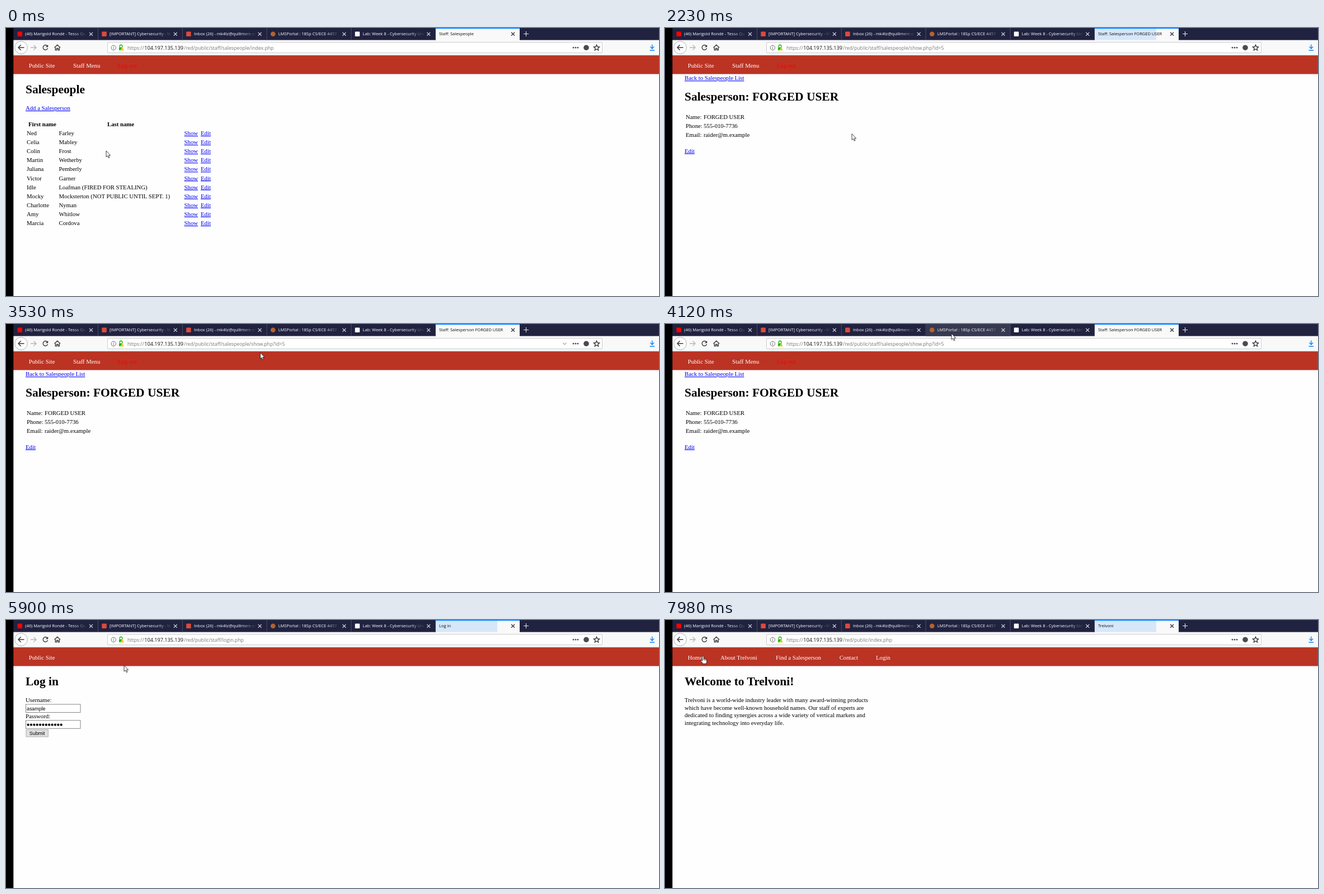
An HTML page that plays this animation: 1167x480 px, repeating every 8 s.

```html
<!DOCTYPE html>
<html lang="en">
<head>
<meta charset="utf-8">
<title>Staff pages</title>
<style>
html, body { margin: 0; width: 100%; height: 100%; overflow: hidden; background: #fff; }
svg { display: block; width: 1167px; height: 480px; }
.page text { font: 10.72px "Liberation Serif", serif; }
.page .h1 { font-size: 21.44px; font-weight: bold; }
.page .th { font-weight: bold; }
.page .nav { fill: #fff; }
.page .out { fill: #f00; }
.page .link { fill: #00e; text-decoration: underline; }
.page .field { font: 8.9px "Liberation Sans", sans-serif; }
.tab { font: 7.5px "Open Sans", sans-serif; }
.url { font: 8.7px "Open Sans", sans-serif; fill: #77777a; }
.line { fill: none; stroke: #38383d; stroke-width: 1.4; }
.thin { stroke: #68686c; stroke-width: 1; }
.blue { stroke: #0a84ff; }
.green { stroke: #12bc00; }
.pale { stroke: #b5b5b8; }
.light { stroke: #e6e6ee; stroke-width: 1.1; }
</style>
</head>
<body>
<svg id="stage" viewBox="0 0 1167 480"></svg>
<script>
const LOOP = 8000;
const STEP = 142;
const ADDRESS = "104.197.135.139";
const COMPANY = "Trelvoni";
const PERSON = "FORGED USER";
const CHROME = "#f9f9fa";

const text = (x, y, s, cls = "") => `<text x="${x}" y="${y}" class="${cls}">${s}</text>`;
const rect = (x, y, w, h, fill, more = "") =>
  `<rect x="${x}" y="${y}" width="${w}" height="${h}" fill="${fill}" ${more}/>`;
const dot = (x, y, r, fill, more = "") => `<circle cx="${x}" cy="${y}" r="${r}" fill="${fill}" ${more}/>`;
const line = (d, cls = "", more = "") => `<path class="line ${cls}" d="${d}" ${more}/>`;
const fade = (id, color, from) =>
  `<linearGradient id="${id}" gradientUnits="userSpaceOnUse" x1="${from}" x2="132">
  <stop stop-color="${color}"/><stop offset="1" stop-color="${color}" stop-opacity="0"/></linearGradient>`;

// Browser frame
const TAB = 150.8;
const tabX = i => 14 + i * TAB;
const square = color => rect(6.5, 6.5, 8.5, 8.5, color, 'rx="1"');
const cross = cls => line("M135 7.8l6 6m0-6l-6 6", cls);

const tabs = [
  ["(46) Marigold Rondé - Tessa Qu", square("#f00")],
  ["[IMPORTANT] Cybersecurity - W", square("#dc4a3d")],
  ["Inbox (26) - mk4tz@quillmere.edu", square("#dc4a3d")],
  ["LMSPortal : 18Sp CS/ECE 4457", dot(10.8, 10.8, 4.3, "#b5622d")],
  ["Lab: Week 8 - Cybersecurity Uni", square("#fff")]
].map(([title, icon], i) => `<g transform="translate(${tabX(i)})" class="tab">
  ${rect(0, 0, TAB, 21.6, "#363950", 'class="hover"')}
  ${icon}<text x="20.3" y="13.4" fill="url(#fadeLight)">${title}</text>${cross("light")}
  ${rect(150, 0, 1, 21.6, "#4b4d66")}</g>`).join("");

const activeTab = `<g transform="translate(768)" class="tab">
  ${rect(0, 0, 150, 22, CHROME)}
  ${rect(0, 1, 0, 20.5, "#d6e7fa", 'id="burst"')}
  ${rect(0, 0, 150, 1.3, "#0a84ff")}
  ${dot(11, 10.8, 2.5, "#0a84ff", 'id="loader"')}
  <text id="title" y="13.4" fill="url(#fadeDark)"></text>${cross("")}</g>`;

const toolbar = `
  ${rect(13, 21.6, 1154, 27.4, CHROME)}${rect(13, 48.3, 1154, 0.8, "#ccc")}
  ${dot(27, 35, 11.3, "#fefefe", 'stroke="#b4b4b6"')}
  ${line("M32.5 35H22m4.7-4.7L22 35l4.7 4.7")}
  ${line("M44 35h10m-4.5-4.5L54 35l-4.5 4.5", "pale")}
  ${rect(61, 26, 18, 18, "#d8d9da", 'id="reloadHover" rx="1.5"')}
  ${line("M74 32.3a4.3 4.3 0 1 0 .6 4")}<path d="M75.2 30v4.2H71z" fill="#38383d"/>
  ${line("M86.5 35.3l5.3-5 5.3 5M88.3 35v4.6h2.3V36.5h2.4v3.1h2.3V35")}
  ${rect(181.5, 25.5, 884, 19, "#fff", 'id="field" rx="1.5"')}
  ${dot(192.3, 35.3, 4.2, "none", 'class="line thin"')}${line("M192.3 34.6v3m0-5v1", "thin")}
  ${rect(202, 34.5, 7, 5.3, "#12bc00", 'rx=".8"')}${line("M203.3 34.5v-2a2.2 2.2 0 0 1 4.4 0v2", "green")}
  <path d="M208 34.5l3.3 5.8h-6.6z" fill="#ffbf00" stroke="#fff" stroke-width=".5"/>
  <text class="url" y="38.8"><tspan x="217">https://</tspan><tspan x="247.3"
    font-size="9.1" fill="#0c0c0d">${ADDRESS}</tspan><tspan x="318" id="path"></tspan></text>
  ${line("M995.3 33.8l3.2 3 3.2-3", "thin", 'id="chevron"')}
  ${[1014, 1018, 1022].map(x => dot(x, 35.2, 1.35, "#4a4a4f")).join("")}${dot(1037, 35.2, 4.8, "#4a4a4f")}
  ${line("M1055.5 30.2l1.5 3.3 3.6.4-2.7 2.4.8 3.5-3.2-1.8-3.2 1.8.8-3.5-2.7-2.4 3.6-.4z")}
  ${line("M1154.8 29.5v7.3m-3.3-3.2l3.3 3.4 3.3-3.4M1150.5 40h8.6", "blue")}`;

// Web pages
const banner = (...items) => rect(13, 49, 1154, 33.5, "#bb3323") +
  items.map(([x, s, cls = "nav"]) => text(x, 71.3, s, cls)).join("");
const staffBanner = banner([40.7, "Public Site"], [120, "Staff Menu"], [200, "Log out", "out"]);

const rowY = (top, i) => top + i * 16.1;
const people = [
  "Ned|Farley", "Celia|Mabley", "Colin|Frost", "Martin|Wetherby", "Juliana|Pemberly",
  "Victor|Garner", "Idle|Loafman (FIRED FOR STEALING)",
  "Mocky|Mocksterton (NOT PUBLIC UNTIL SEPT. 1)", "Charlotte|Nyman", "Amy|Whitlow", "Marcia|Cordova"
];
const personRow = (person, i) => {
  const y = rowY(192, i);
  const [first, last] = person.split("|");
  return text(37, y, first) + text(94.5, y, last) +
    text(318.6, y, "Show", "link") + text(348, y, "Edit", "link");
};
const detailRow = ([label, value], i) => text(37, rowY(162.6, i), label) + text(69, rowY(162.6, i), value);
const input = y => rect(35.5, y, 97.5, 14.5, "#fff", 'class="input"');
const bullets = Array.from({ length: 12 }, (_, i) => dot(39.6 + i * 5.37, 187.7, 2.1, "#000")).join("");

const pages = {
  list: {
    title: "Staff: Salespeople", path: "/red/public/staff/salespeople/index.php",
    body: staffBanner + text(35, 117, "Salespeople", "h1") +
      text(35, 147, "Add a Salesperson", "link") +
      text(40, 176, "First name", "th") + text(181, 176, "Last name", "th") +
      people.map(personRow).join("")
  },
  show: {
    title: `Staff: Salesperson ${PERSON}`, path: "/red/public/staff/salespeople/show.php?id=5",
    body: staffBanner + text(35, 93.3, "Back to Salespeople List", "link") +
      text(35, 130.4, `Salesperson: ${PERSON}`, "h1") +
      [["Name:", PERSON], ["Phone:", "555-010-7736"], ["Email:", "raider@m.example"]].map(detailRow).join("") +
      text(35, 223.7, "Edit", "link")
  },
  login: {
    title: "Log in", path: "/red/public/staff/login.php",
    body: banner([40.7, "Public Site"]) + text(35, 117, "Log in", "h1") +
      text(35, 147, "Username:") + input(151) + text(37, 161.8, "asample", "field") +
      text(35, 176, "Password:") + input(179.8) + bullets +
      rect(36, 196.5, 39.3, 12.6, "#e1e1e1", 'stroke="#adadad"') + text(41.8, 206, "Submit", "field")
  },
  home: {
    title: COMPANY, path: "/red/public/index.php",
    body: banner([40.7, "Home"], [99, `About ${COMPANY}`], [198, "Find a Salesperson"],
      [311.7, "Contact"], [377, "Login"]) +
      text(35, 117, `Welcome to ${COMPANY}!`, "h1") +
      [`${COMPANY} is a world-wide industry leader with many award-winning products`,
        "which have become well-known household names. Our staff of experts are",
        "dedicated to finding synergies across a wide variety of vertical markets and",
        "integrating technology into everyday life."]
        .map((s, i) => text(35, 147 + i * 13.5, s)).join("")
  }
};

const byId = id => document.getElementById(id);
byId("stage").innerHTML = `<defs>${fade("fadeLight", "#fff", 104)}${fade("fadeDark", "#0c0c0d", 121)}</defs>
  ${rect(0, 0, 1167, 480, "#fefefe")}
  ${Object.entries(pages).map(([id, p]) => `<g class="page" id="${id}">${p.body}</g>`).join("")}
  ${toolbar}${rect(13, 0, 1154, 21.6, "#20223f")}${tabs}${activeTab}
  ${line("M925 10.5h9m-4.5-4.5v9", "light")}${rect(0, 0, 13.3, 480, "#000")}
  <g id="cursor" fill="#fff" stroke="#111" stroke-width=".8" stroke-linejoin="round">
    <path id="arrow" d="M0 0V11L2.5 8.8 4.2 12.7 6 12 4.3 8.2H7.6z"/>
    <path id="hand" d="M-1.3 1.2Q0-.6 1.2 1.2V5Q2.5 4.2 3.3 5.4 4.6 4.7 5.2 6 6.6 5.6 6.7 7.2V10Q6.5 12 5.5 14H-.6Q-1.5 11.5-3.8 9.4-4.5 7.4-2.7 7.8L-1.3 9zM1.2 5V8M3.3 5.4V8.2M5.2 6V8.4"/>
  </g>`;

// Pointer glides: first step, step count, end point, optional bend point
const START = [179, 220];
const glides = [
  { at: 260, steps: 2, to: [218, 250] },
  { at: 950, steps: 6, to: [334, 189.5] },
  { at: 2240, steps: 6, to: [436.5, 18] },
  { at: 3250, steps: 6, to: [512, 17], bend: [470, 105] },
  { at: 4225, steps: 8, to: [226, 66.5], bend: [370, 125] },
  { at: 5780, steps: 5, to: [82, 207] },
  { at: 6560, steps: 4, to: [63.3, 29.5] },
  { at: 7290, steps: 4, to: [68, 64.3] }
];
const visits = [
  { page: "list", load: 0, ready: 0 },
  { page: "show", load: 1820, ready: 2100 },
  { page: "login", load: 5510, ready: 5650 },
  { page: "home", load: 7710, ready: 7850 }
];

const smooth = u => u * u * (3 - 2 * u);

function pointerAt(t) {
  let from = START;
  for (const { at, steps, to, bend } of glides) {
    if (t < at) break;
    const u = smooth(Math.min(1, (Math.floor((t - at) / STEP) + 1) / steps));
    const a = from;
    from = to.map((end, i) => {
      const mid = bend ? bend[i] : (a[i] + end) / 2;
      return a[i] * (1 - u) ** 2 + 2 * mid * u * (1 - u) + end * u * u;
    });
  }
  return from;
}

const inside = ([x, y], box, pad = 0) =>
  x >= box.x - pad && x <= box.x + box.width + pad && y >= box.y && y <= box.y + box.height;
const over = (point, el, pad) => inside(point, el.getBBox(), pad);
const show = (el, on) => el.setAttribute("visibility", on ? "visible" : "hidden");
const hovers = [...document.querySelectorAll(".hover")];
const inputs = [...document.querySelectorAll(".input")];

function draw(t) {
  const point = pointerAt(t);
  const visit = visits.filter(v => v.ready <= t).pop();
  const loading = visits.some(v => t >= v.load && t < v.ready);
  const page = pages[visit.page];

  for (const id in pages) byId(id).style.display = id === visit.page ? "" : "none";
  byId("title").textContent = page.title;
  byId("title").setAttribute("x", loading ? 20.5 : 6);
  byId("path").textContent = page.path;
  show(byId("loader"), loading);
  const burst = Math.floor((t - visit.ready) / 130) + 1;
  byId("burst").setAttribute("width", visit.ready && burst < 3 ? 55 * burst : 0);

  const links = [...byId(visit.page).querySelectorAll(".link, .nav, .out")];
  const hand = links.some(el => over(point, el, 3));
  byId("cursor").setAttribute("transform", `translate(${point})`);
  show(byId("arrow"), !hand);
  show(byId("hand"), hand);

  hovers.forEach((el, i) => show(el, inside(point, { x: tabX(i), y: 0, width: TAB, height: 21.6 })));
  const field = byId("field");
  field.setAttribute("stroke", over(point, field) ? "#b0b0b3" : "#ccccce");
  show(byId("chevron"), over(point, field) || over(pointerAt(t - STEP), field));
  show(byId("reloadHover"), over(point, byId("reloadHover")));
  for (const el of inputs) el.setAttribute("stroke", over(point, el) ? "#222" : "#858585");
}

const start = performance.now();
function tick() {
  draw((performance.now() - start) % LOOP);
  requestAnimationFrame(tick);
}
tick();
</script>
</body>
</html>
```
